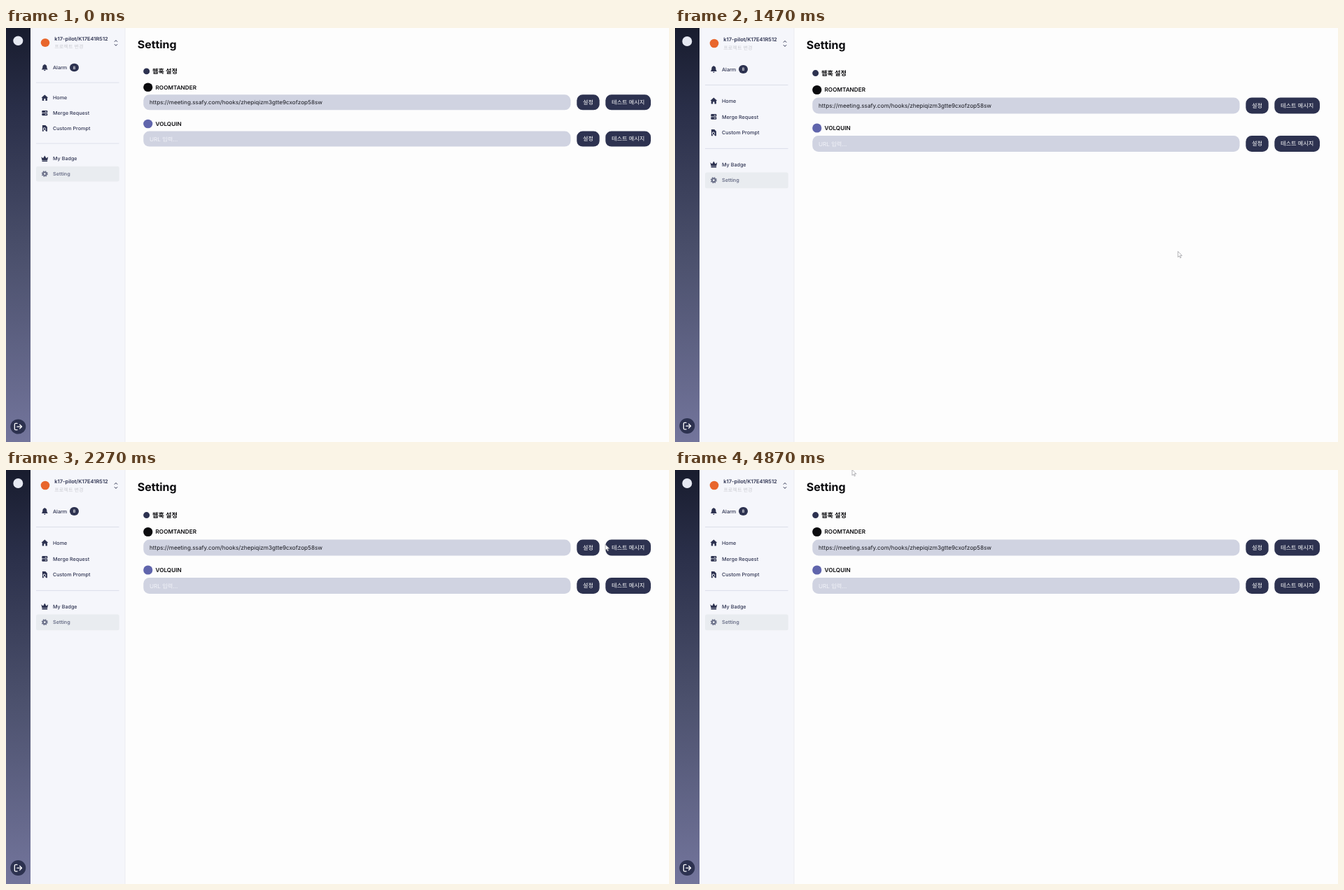
Recreate the animation shown at these times as an HTML page. Size 947 by 592 pixels, loop 4.94 s.

```html
<!DOCTYPE html>
<html lang="ko">
<head>
<meta charset="utf-8">
<title>Setting</title>
<style>
  html, body { margin: 0; width: 100%; height: 100%; overflow: hidden; background: #fdfdfd; }
  svg { display: block; width: 100vw; height: 100vh; }
  text { font-family: Inter, "Noto Sans CJK KR", "Noto Sans CJK", "Noto Sans", sans-serif; text-rendering: geometricPrecision; white-space: pre; }
</style>
</head>
<body>
<svg id="stage" viewBox="0 0 947 592" preserveAspectRatio="none" xmlns="http://www.w3.org/2000/svg">
  <defs>
    <linearGradient id="rail" x1="0" y1="0" x2="0" y2="1">
      <stop offset="0" stop-color="#181c2e"/>
      <stop offset=".2" stop-color="#2a2f49"/>
      <stop offset=".55" stop-color="#4b506c"/>
      <stop offset="1" stop-color="#73759c"/>
    </linearGradient>
  </defs>
  <rect width="947" height="592" fill="#fdfdfd"/>
  <rect x="35" width="135" height="592" fill="#f5f6fb"/>
  <rect x="169.5" width="1" height="592" fill="#ececf1"/>
  <rect width="35" height="592" fill="url(#rail)"/>
  <g id="page"></g>
  <g id="exit">
    <circle cx="17.3" cy="569" r="11" fill="#2d3250"/>
    <path d="M16 564.3h-2.2q-1.5 0-1.5 1.5v6.6q0 1.5 1.5 1.5H16M15.8 569.1h6.6M19.7 566.2l2.9 2.9-2.9 2.9"
      fill="none" stroke="#fff" stroke-width="1.3" stroke-linecap="round" stroke-linejoin="round"/>
  </g>
  <g id="cursor">
    <path id="arrow" d="M0 0V8.2L1.9 6.5 3.2 9.4 4.5 8.8 3.2 6H5.9Z"
      fill="#fff" stroke="#8b8b92" stroke-width=".65" stroke-linejoin="round"/>
    <path id="hand" d="M-.9 .8Q0-.4 .9 .8V4L3.6 4.6Q5 5 4.8 6.6L4.1 10.6H-1L-3.6 6.8Q-3.6 5.4-2.2 6L-.9 7.1Z"
      fill="#fff" stroke="#77777f" stroke-width=".5" stroke-linejoin="round"/>
  </g>
</svg>
<script>
const LOOP = 4940, STEP = 200 / 3, RESIZE = 130, SQUEEZE = 0.958;
const NAVY = '#2d3250', BLACK = '#0b0b0e';
const $ = id => document.getElementById(id);

// y is the middle of the capitals
const text = (x, y, str, size, weight, fill, anchor = 'start') =>
  `<text x="${x}" y="${y + size * 0.364}" font-size="${size}" font-weight="${weight}" fill="${fill}" text-anchor="${anchor}">${str}</text>`;
const rect = (x, y, w, h, r, fill) =>
  `<rect x="${x}" y="${y}" width="${w}" height="${h}" rx="${r}" fill="${fill}"/>`;
const dot = (x, y, r, fill) => `<circle cx="${x}" cy="${y}" r="${r}" fill="${fill}"/>`;

// icons are drawn around their own centre
const icons = {
  bell: '<path d="M-4.2 2.6Q-3 1.6-3-.8Q-3-4-.5-4.3V-4.9H.5V-4.3Q3-4 3-.8Q3 1.6 4.2 2.6V3.1H-4.2ZM-1.3 3.7H1.3Q1 5 0 5T-1.3 3.7Z"/>',
  home: '<path d="M0-4.7 4.9-.3H3.6V4.3H1.1V1.2H-1.1V4.3H-3.6V-.3H-4.9Z"/>',
  stack: '<path d="M-3-3.9H3Q4-3.9 4-2.9V-1.3Q4-.4 3-.4H-3Q-4-.4-4-1.3V-2.9Q-4-3.9-3-3.9ZM-3 .3H3Q4 .3 4 1.2V2.8Q4 3.8 3 3.8H-3Q-4 3.8-4 2.8V1.2Q-4 .3-3 .3Z"/><path d="M.5-2.1H2.7M.5 2H2.7" stroke="#f5f6fb" stroke-width=".9"/>',
  file: '<path d="M-3.4-4.6H1L3.6-2V4.6H1.8V1.5A2.2 2.2 0 1 0-1.5 2.9V4.6H-3.4Z"/><circle cx="-.2" cy="1.2" r="1.3"/><path d="M.5 2 2.3 4.3" stroke="#2d3250"/>',
  crown: '<path d="M-4.9-2.7-2.3-.5 0-4.5 2.3-.5 4.9-2.7 3.8 2.5H-3.8ZM-3.8 3.1H3.8V4.4H-3.8Z"/>',
  gear: '<circle r="2.4" fill="none" stroke="#6b7089" stroke-width="2"/><circle r="3.7" fill="none" stroke="#6b7089" stroke-width="1.7" stroke-dasharray="1.55 1.356"/>'
};
const item = (icon, y, label, weight = 500, fill = NAVY) =>
  `<g transform="translate(55.3 ${y})" fill="${NAVY}">${icons[icon]}</g>` + text(67, y, label, 7.2, weight, fill);
const divider = y => rect(43, y - 0.4, 118.5, 0.8, 0, '#d5d8e5');

const button = (x, y, w, label) =>
  rect(x, y, w, 23, 8.5, NAVY) + text(x + w / 2, y + 11.5, label, 8.2, 500, '#fff', 'middle');
const hook = (y, color, name, value, ink) =>
  dot(202.8, y, 6.6, color) + text(213.5, y, name, 8.2, 600, BLACK) +
  rect(196.3, y + 11, 610.2, 23, 8.5, '#d0d3e1') + text(205, y + 22.7, value, 8.18, 400, ink) +
  button(815.3, y + 11, 32.4, '설정') + button(856.3, y + 11, 64.7, '테스트 메시지');

$('page').innerHTML = [
  dot(17.3, 19, 7, '#e6e9f2'),
  dot(56, 22, 6.3, '#e8662c'),
  text(69.3, 16.5, 'k17-pilot/K17E41R512', 7.5, 600, NAVY),
  text(69.3, 28.2, '프로젝트 변경', 7.1, 400, '#cacbd1'),
  '<path d="M154.9 20.6 157 18.4 159.1 20.6M154.9 24.2 157 26.4 159.1 24.2" fill="none" stroke="#2d3250"/>',
  item('bell', 59, 'Alarm'),
  rect(91, 53, 13, 12, 6, NAVY), text(97.5, 59, '8', 6.2, 500, '#fff', 'middle'),
  divider(81.5),
  item('home', 104.3, 'Home'),
  item('stack', 127, 'Merge Request'),
  item('file', 149.7, 'Custom Prompt'),
  divider(172.3),
  item('crown', 195, 'My Badge'),
  rect(43, 206.5, 118.7, 22.7, 2.5, '#e9ecf0'),
  item('gear', 217.7, 'Setting', 600, '#6b7089'),
  text(187.7, 24.2, 'Setting', 16, 700, BLACK),
  dot(200.7, 64.6, 4.5, NAVY), text(209, 64.6, '웹훅 설정', 9.2, 700, BLACK),
  hook(88.5, BLACK, 'ROOMTANDER', 'https://meeting.ssafy.com/hooks/zhepiqizm3gtte9cxofzop58sw', '#17181f'),
  hook(143, '#6065ac', 'VOLQUIN', 'URL 입력...', '#f1f2f8')
].join('');

const linear = u => u, easeIn = u => u ** 1.6, easeOut = u => 1 - (1 - u) ** 2;
// start, end, from, to, easing of x, easing of y
const moves = [
  [1270, 1800, [610, 600], [786.5, 143], easeOut, easeOut],
  [1800, 2270, [786.5, 143], [856, 106.5], easeOut, easeOut],
  [2270, 2870, [856, 106.5], [884.5, 105.2], easeOut, easeOut],
  [3730, 4870, [846, 104.5], [253, -0.5], linear, easeIn]
];

function cursorAt(time) {
  const t = Math.floor((time + 5) / STEP) * STEP + 4;
  const move = moves.filter(m => t >= m[0]).pop();
  if (!move) return null;
  const [start, end, a, b, easeX, easeY] = move;
  const u = Math.min(1, (t - start) / (end - start));
  return [a[0] + (b[0] - a[0]) * easeX(u), a[1] + (b[1] - a[1]) * easeY(u)];
}

const overButton = ([x, y]) =>
  (y > 99.5 && y < 122.5 || y > 154 && y < 177) && (x > 815.3 && x < 847.7 || x > 857 && x < 921);
const show = (id, on) => $(id).setAttribute('display', on ? 'inline' : 'none');

function draw(t) {
  const k = t < RESIZE ? SQUEEZE : 1;
  $('page').setAttribute('transform', `scale(1 ${k})`);
  $('exit').setAttribute('transform', `translate(0 ${592 * (1 - k)}) scale(1 ${k})`);
  const p = cursorAt(t);
  show('cursor', p);
  if (!p) return;
  const hand = overButton(p);
  show('hand', hand);
  show('arrow', !hand);
  $('cursor').setAttribute('transform', `translate(${p[0]} ${p[1]})`);
}

const begin = performance.now();
function tick() {
  draw((performance.now() - begin) % LOOP);
  requestAnimationFrame(tick);
}
tick();
</script>
</body>
</html>
```
